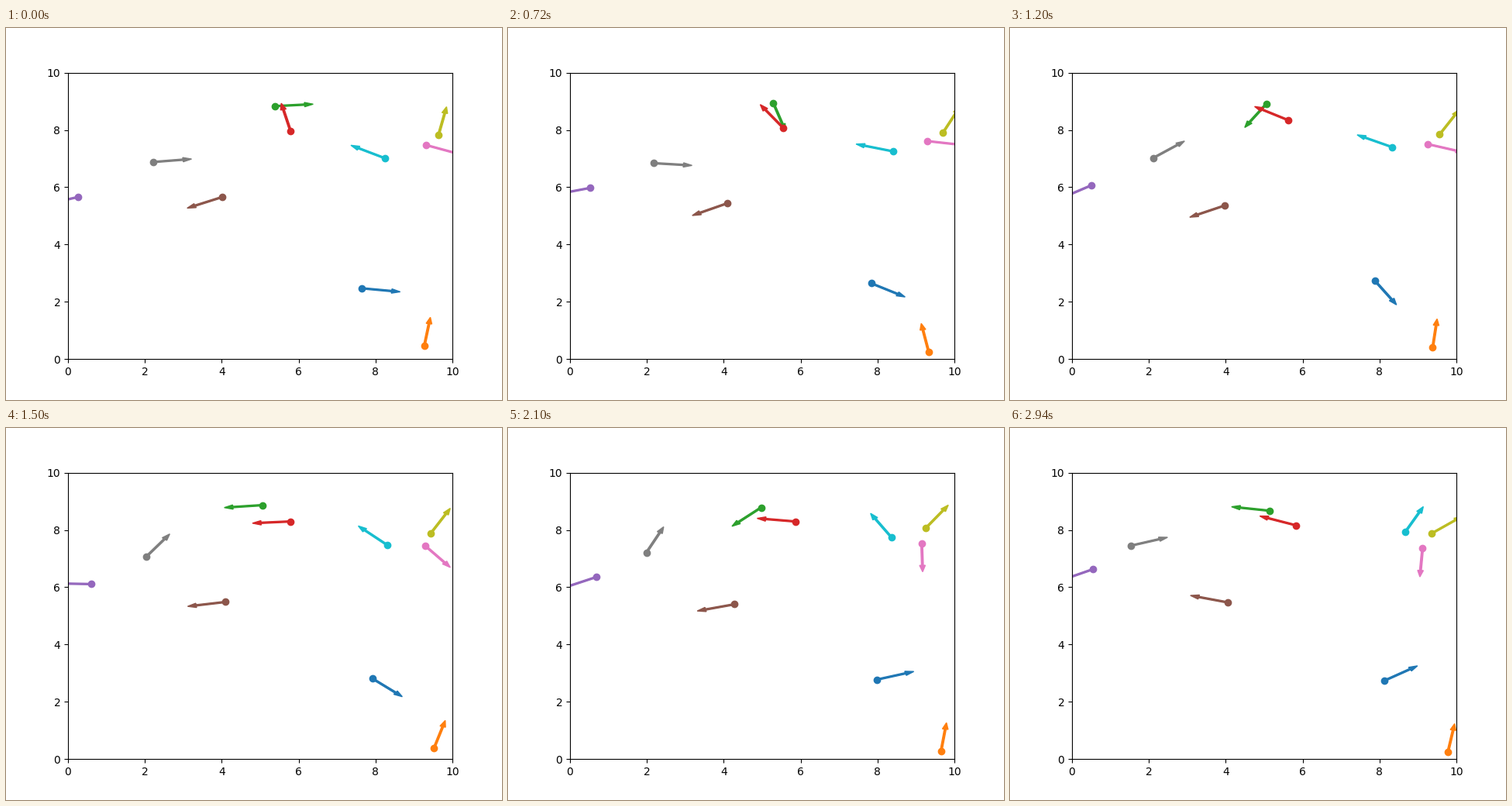
These frames come from a looping animation (640x480 px, 3 s). A matplotlib script:

```python
import numpy as np
import matplotlib.pyplot as plt
from matplotlib.animation import FuncAnimation

FRAMES = 50
INTERVAL = 60
STEP, TURN = 0.04, 7  # jitter per tick: data units, degrees

# Start point, end point, headings at the start, middle and end
WALKERS = [
    ((7.65, 2.47), (8.13, 2.74), (-7, -42, 31)),
    ((9.27, 0.47), (9.78, 0.25), (81, 71, 80)),
    ((5.38, 8.83), (5.14, 8.67), (4, -172, -188)),
    ((5.79, 7.96), (5.83, 8.16), (104, 173, 161)),
    ((0.27, 5.66), (0.55, 6.63), (197, 178, 205)),
    ((4.02, 5.66), (4.05, 5.47), (203, 192, 166)),
    ((9.32, 7.47), (9.12, 7.36), (-20, -43, -94)),
    ((2.22, 6.88), (1.53, 7.45), (6, 45, 17)),
    ((9.64, 7.83), (9.36, 7.88), (78, 56, 37)),
    ((8.25, 7.01), (8.67, 7.93), (153, 138, 62)),
]

rng = np.random.default_rng(4)


def walk(points, scale):
    """Random walk pinned to evenly spaced waypoints."""
    keys = np.linspace(0, FRAMES - 1, len(points)).round().astype(int)
    noise = rng.normal(0, scale, FRAMES).cumsum()
    return noise + np.interp(np.arange(FRAMES), keys, points - noise[keys])


def path(start, end, headings):
    x, y = (np.clip(walk(ends, STEP), 0, 10) for ends in zip(start, end))
    angle = np.radians(walk(headings, TURN))
    return np.column_stack([x, y, np.cos(angle), np.sin(angle)])


paths = [path(*walker) for walker in WALKERS]

fig, ax = plt.subplots(figsize=(6.4, 4.8), dpi=100)
dots, arrows = [], []
for i, poses in enumerate(paths):
    x, y, dx, dy = poses[0]
    dots += ax.plot(x, y, "o", color=f"C{i}")
    arrows.append(ax.arrow(x, y, dx, dy, width=0.05, color=f"C{i}",
                           length_includes_head=True))
ax.set(xlim=(0, 10), ylim=(0, 10))


def update(k):
    for dot, arrow, poses in zip(dots, arrows, paths):
        x, y, dx, dy = poses[k]
        dot.set_data([x], [y])
        arrow.set_data(x=x, y=y, dx=dx, dy=dy)
    return dots + arrows


anim = FuncAnimation(fig, update, frames=FRAMES, interval=INTERVAL,
                     repeat=True, repeat_delay=0)
plt.show()
```
